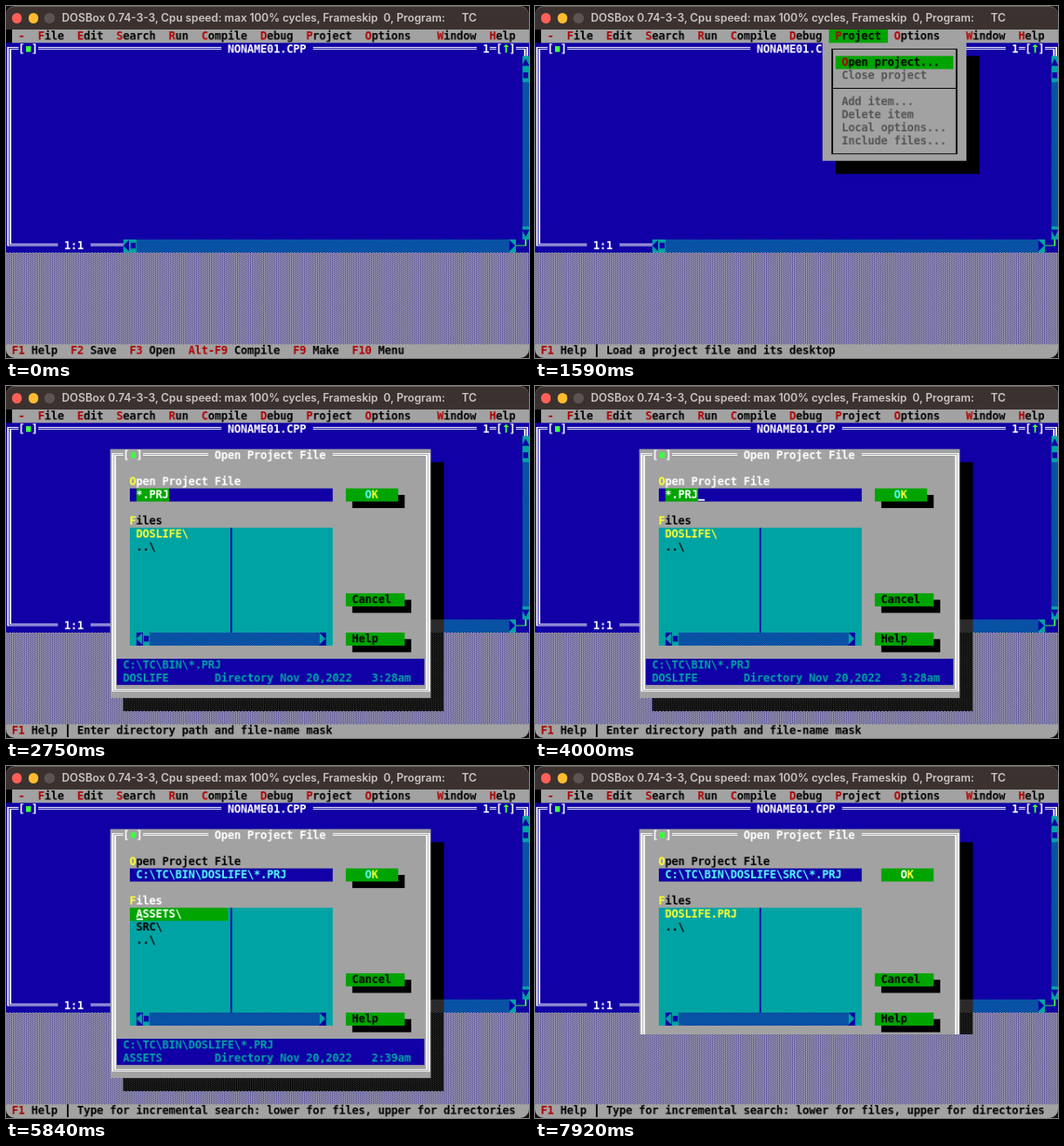
An HTML page with a canvas for the animation above (8 s loop, 600x404 px).

```html
<!DOCTYPE html>
<html lang="en">
<head>
<meta charset="utf-8">
<title>DOS IDE</title>
<style>
  html, body { margin: 0; width: 100%; height: 100%; overflow: hidden; background: #15110f; }
  .window { position: relative; width: 600px; height: 404px; border-radius: 10px; overflow: hidden; background: #3b3230; }
  .bar { position: absolute; inset: 0 0 auto; height: 28px; border-radius: 10px 10px 0 0; box-shadow: inset 0 1px #6d6462; }
  .bar i { position: absolute; top: 8.3px; width: 11.4px; height: 11.4px; border-radius: 50%; }
  .bar span { position: absolute; left: 64px; top: 0; font: 600 12.6px/28px Inter, sans-serif; color: #c9c4c2; white-space: pre; }
  canvas { position: absolute; left: 0; top: 0; }
</style>
</head>
<body>
<div class="window">
  <canvas id="stage" width="600" height="404"></canvas>
  <div class="bar">
    <i style="left:6.7px;background:#ff5f57"></i>
    <i style="left:25.6px;background:#febc2e"></i>
    <i style="left:44.4px;background:#5d5452"></i>
    <span>DOSBox 0.74-3-3, Cpu speed: max 100% cycles, Frameskip  0, Program:      TC</span>
  </div>
</div>
<script>
const COLS = 80, ROWS = 25, CW = 8, CH = 16;
const LOOP = 8000, STEP = 1000 / 12, BLINK = 228.4;
const VIEW = { x: -0.5, y: 27.3, w: 600.5, h: 376 };
const BLACK = '#000', BLUE = '#1000a5', GREEN = '#00a400', CYAN = '#00a3a3', RED = '#b00000',
      GRAY = '#a2a2a2', DARK = '#555', LIME = '#3cff3c', AQUA = '#55ffff', YELLOW = '#ffff30', WHITE = '#fff';

const ctx = document.getElementById('stage').getContext('2d');
const buffer = document.createElement('canvas');
buffer.width = COLS * CW;
buffer.height = ROWS * CH;
const pen = buffer.getContext('2d');
let cells = [];

// Line and block glyphs as rectangles in an 8 x 16 cell
const steps = (n, rect) => Array.from({ length: n }, (_, i) => rect(i));
const glyphs = {
  '─': [[0, 7, 8, 1]],
  '│': [[3, 0, 2, 16]],
  '┌': [[3, 7, 5, 1], [3, 7, 2, 9]],
  '┐': [[0, 7, 5, 1], [3, 7, 2, 9]],
  '└': [[3, 7, 5, 1], [3, 0, 2, 8]],
  '┘': [[0, 7, 5, 1], [3, 0, 2, 8]],
  '├': [[3, 0, 2, 16], [3, 7, 5, 1]],
  '┤': [[3, 0, 2, 16], [0, 7, 5, 1]],
  '═': [[0, 5, 8, 1], [0, 7, 8, 1]],
  '║': [[2, 0, 2, 16], [5, 0, 2, 16]],
  '╔': [[2, 5, 6, 1], [2, 5, 2, 11], [5, 7, 3, 1], [5, 7, 2, 9]],
  '╗': [[0, 5, 7, 1], [5, 5, 2, 11], [0, 7, 4, 1], [2, 7, 2, 9]],
  '╚': [[2, 0, 2, 8], [2, 7, 6, 1], [5, 0, 2, 6], [5, 5, 3, 1]],
  '╝': [[5, 0, 2, 8], [0, 7, 7, 1], [2, 0, 2, 6], [0, 5, 4, 1]],
  '■': [[1, 4, 6, 7]],
  '▄': [[0, 8, 8, 8]],
  '▀': [[0, 0, 8, 8]],
  '▲': steps(4, i => [3 - i, 4 + 2 * i, 2 + 2 * i, 2]),
  '▼': steps(4, i => [i, 4 + 2 * i, 8 - 2 * i, 2]),
  '►': steps(7, i => [i, 1 + i, 1, 13 - 2 * i]),
  '◄': steps(7, i => [6 - i, 1 + i, 1, 13 - 2 * i]),
  '↑': [[3, 2, 2, 10], [2, 3, 4, 1], [1, 4, 6, 1]],
  '░': steps(32, i => [i % 2 * 4 + (i >> 1 & 1 ? 1 : 3), i >> 1, 1, 1]),
  '▒': steps(64, i => [i % 4 * 2 + (i >> 2 & 1 ? 0 : 1), i >> 2, 1, 1])
};

function put(col, row, ch, fg, bg) {
  if (col < COLS && row < ROWS) cells[row * COLS + col] = { ch, fg, bg };
}

// Characters between tildes take the hot colour
function text(col, row, str, fg, bg, hot = RED) {
  let isHot = false;
  for (const ch of str) {
    if (ch === '~') isHot = !isHot;
    else put(col++, row, ch, isHot ? hot : fg, bg);
  }
}

function fill(col, row, w, h, bg, ch = ' ', fg = BLACK) {
  for (let y = row; y < row + h; y++)
    for (let x = col; x < col + w; x++) put(x, y, ch, fg, bg);
}

function box(col, row, w, h, [tl, hz, tr, vt, bl, br], fg, bg) {
  fill(col, row, w, h, bg);
  fill(col, row, w, 1, bg, hz, fg);
  fill(col, row + h - 1, w, 1, bg, hz, fg);
  fill(col, row, 1, h, bg, vt, fg);
  fill(col + w - 1, row, 1, h, bg, vt, fg);
  put(col, row, tl, fg, bg);
  put(col + w - 1, row, tr, fg, bg);
  put(col, row + h - 1, bl, fg, bg);
  put(col + w - 1, row + h - 1, br, fg, bg);
}

function shadow(col, row, w, h) {
  for (let y = row + 1; y <= row + h; y++)
    for (let x = col + 2; x < col + w + 2; x++)
      put(x, y, cells[y * COLS + x].ch, DARK, BLACK);
}

function desktop({ hint, menu }) {
  fill(0, 0, COLS, 1, GRAY);
  put(0, 0, ' ', BLACK, BLACK);
  text(2, 0, '~-~  ~F~ile  ~E~dit  ~S~earch  ~R~un  ~C~ompile  ~D~ebug  ~P~roject  ~O~ptions    ~W~indow  ~H~elp', BLACK, GRAY);
  if (menu) text(45, 0, ' ~P~roject ', BLACK, GREEN);

  fill(0, 17, COLS, 7, GRAY, '░', BLUE);
  box(0, 1, COLS, 16, '╔═╗║╚╝', WHITE, BLUE);
  text(2, 1, '[~■~]', WHITE, BLUE, LIME);
  text(33, 1, ' NONAME01.CPP ', WHITE, BLUE);
  text(72, 1, ' 1═[~↑~]', WHITE, BLUE, LIME);
  text(8, 16, ' 1:1 ', WHITE, BLUE);

  fill(79, 2, 1, 14, BLUE, '▒', CYAN);
  put(79, 2, '▲', BLUE, CYAN);
  put(79, 3, '■', BLUE, CYAN);
  put(79, 15, '▼', BLUE, CYAN);
  fill(18, 16, 60, 1, BLUE, '▒', CYAN);
  text(18, 16, '◄■', BLUE, CYAN);
  put(77, 16, '►', BLUE, CYAN);
  text(78, 16, '─┘', LIME, BLUE);

  fill(0, 24, COLS, 1, GRAY);
  const keys = '~F2~ Save  ~F3~ Open  ~Alt-F9~ Compile  ~F9~ Make  ~F10~ Menu';
  text(1, 24, '~F1~ Help ' + (hint ? '│ ' + hint : ' ' + keys), BLACK, GRAY);
}

function projectMenu() {
  shadow(44, 1, 22, 9);
  fill(44, 1, 22, 9, GRAY);
  box(45, 1, 20, 9, '┌─┐│└┘', BLACK, GRAY);
  text(45, 4, '├' + '─'.repeat(18) + '┤', BLACK, GRAY);
  fill(46, 2, 18, 1, GREEN);
  text(47, 2, '~O~pen project...', BLACK, GREEN);
  text(47, 3, 'Close project', DARK, GRAY);
  ['Add item...', 'Delete item', 'Local options...', 'Include files...']
    .forEach((item, i) => text(47, 5 + i, item, DARK, GRAY));
}

function button(col, row, w, label, indent, fg, pressed) {
  if (pressed) col++;
  else {
    put(col + w, row, '▄', BLACK, GRAY);
    fill(col + 1, row + 1, w, 1, GRAY, '▀');
  }
  fill(col, row, w, 1, GREEN);
  text(col + indent, row, label, fg, GREEN, YELLOW);
}

function dialog({ focus, dir, input, files, pick = 0, info }) {
  const inList = focus === 'list', inInput = focus === 'input', inButton = focus === 'ok';
  shadow(16, 3, 49, 19);
  box(16, 3, 49, 19, '╔═╗║╚╝', WHITE, GRAY);
  text(18, 3, '[~■~]', WHITE, GRAY, LIME);
  text(31, 3, ' Open Project File ', WHITE, GRAY);

  text(19, 5, '~O~pen Project File', inInput ? WHITE : BLACK, GRAY, YELLOW);
  fill(19, 6, 31, 1, BLUE);
  text(20, 6, input, inInput ? WHITE : AQUA, inInput ? GREEN : BLUE);

  text(19, 8, '~F~iles', inList ? WHITE : BLACK, GRAY, YELLOW);
  fill(19, 9, 31, 9, CYAN);
  fill(34, 9, 1, 8, CYAN, '│', BLUE);
  files.forEach((name, i) => {
    const picked = i === pick, bg = picked && inList ? GREEN : CYAN;
    fill(19, 9 + i, 15, 1, bg);
    text(20, 9 + i, name, !picked ? BLACK : inList ? WHITE : YELLOW, bg);
  });
  fill(20, 17, 29, 1, BLUE, '▒', CYAN);
  put(20, 17, '◄', CYAN, BLUE);
  put(21, 17, '■', BLUE, CYAN);
  put(48, 17, '►', CYAN, BLUE);

  button(52, 6, 8, 'O~K~', 3, inButton ? WHITE : AQUA, inButton);
  button(52, 14, 9, 'Cancel', 1, BLACK);
  button(52, 17, 9, 'Help', 1, BLACK);

  const [name, size, time] = info;
  fill(17, 19, 47, 2, BLUE);
  text(18, 19, dir + '*.PRJ', CYAN, BLUE);
  text(18, 20, name.padEnd(12) + size.padStart(11) + ' Nov 20,2022   ' + time, CYAN, BLUE);
}

const typeHint = 'Type for incremental search: lower for files, upper for directories';
const bin = {
  dir: 'C:\\TC\\BIN\\', input: '*.PRJ', files: ['DOSLIFE\\', '..\\'],
  info: ['DOSLIFE', 'Directory', '3:28am']
};
const life = {
  dir: 'C:\\TC\\BIN\\DOSLIFE\\', input: 'C:\\TC\\BIN\\DOSLIFE\\*.PRJ', files: ['ASSETS\\', 'SRC\\', '..\\'],
  info: ['ASSETS', 'Directory', '2:39am'], focus: 'list'
};
const src = {
  dir: 'C:\\TC\\BIN\\DOSLIFE\\SRC\\', input: 'C:\\TC\\BIN\\DOSLIFE\\SRC\\*.PRJ', files: ['DOSLIFE.PRJ', '..\\'],
  info: ['DOSLIFE.PRJ', '4572', '3:25am'], focus: 'list'
};

const stages = [
  { at: 0, cursor: [1, 2, YELLOW] },
  { at: 1160, menu: true, hint: 'Load a project file and its desktop' },
  { at: 1830, hint: 'Enter directory path and file-name mask', dialog: { ...bin, focus: 'input' }, cursor: [25, 6, WHITE] },
  { at: 4410, hint: typeHint, dialog: { ...bin, focus: 'list' }, cursor: [20, 9, WHITE] },
  { at: 5080, hint: typeHint, dialog: life, cursor: [20, 9, WHITE] },
  { at: 6080, hint: typeHint, cursor: [20, 10, WHITE],
    dialog: { ...life, pick: 1, input: 'SRC\\*.PRJ', info: ['SRC', 'Directory', '3:25am'] } },
  { at: 6660, hint: typeHint, dialog: src, cursor: [20, 9, WHITE] },
  { at: 7830, hint: typeHint, dialog: { ...src, focus: 'ok' } },
  { at: 7910, hint: typeHint, dialog: { ...src, focus: 'ok' }, wipeFrom: 299 }
];

function paint(stage, cursorOn) {
  cells = [];
  desktop(stage);
  if (stage.menu) projectMenu();
  if (stage.dialog) dialog(stage.dialog);

  pen.font = 'bold 13.6px "DejaVu Sans Mono", monospace';
  pen.textAlign = 'center';
  cells.forEach(({ ch, fg, bg }, i) => {
    const x = i % COLS * CW, y = Math.floor(i / COLS) * CH;
    pen.fillStyle = bg;
    pen.fillRect(x, y, CW, CH);
    pen.fillStyle = fg;
    if (glyphs[ch]) for (const [gx, gy, w, h] of glyphs[ch]) pen.fillRect(x + gx, y + gy, w, h);
    else if (ch !== ' ') pen.fillText(ch, x + 3.6, y + 12);
  });
  if (cursorOn && stage.cursor) {
    const [col, row, color] = stage.cursor;
    pen.fillStyle = color;
    pen.fillRect(col * CW, row * CH + 13, CW, 2);
  }
}

function blit(top = 0) {
  const scale = VIEW.h / buffer.height, h = buffer.height - top;
  ctx.drawImage(buffer, 0, top, buffer.width, h, VIEW.x, VIEW.y + top * scale, VIEW.w, h * scale);
}

function show(stage, cursorOn) {
  ctx.clearRect(0, 0, 600, 404);
  ctx.fillStyle = GRAY;
  ctx.fillRect(0, 400, 600, 4);
  paint(stage, cursorOn);
  blit();
  if (stage.wipeFrom) {
    paint({ hint: stage.hint }, false);
    blit(stage.wipeFrom);
  }
}

const start = performance.now();
let shown = '';

function tick() {
  const elapsed = (performance.now() - start) % LOOP;
  const time = Math.floor(elapsed / STEP + 1e-6) * STEP;
  const index = stages.findLastIndex(stage => stage.at <= time);
  const phase = time % BLINK, cursorOn = phase >= 60 && phase < 174;
  const key = index + '/' + cursorOn;
  if (key !== shown) {
    shown = key;
    show(stages[index], cursorOn);
  }
  requestAnimationFrame(tick);
}

ctx.imageSmoothingQuality = 'high';
tick();
</script>
</body>
</html>
```
